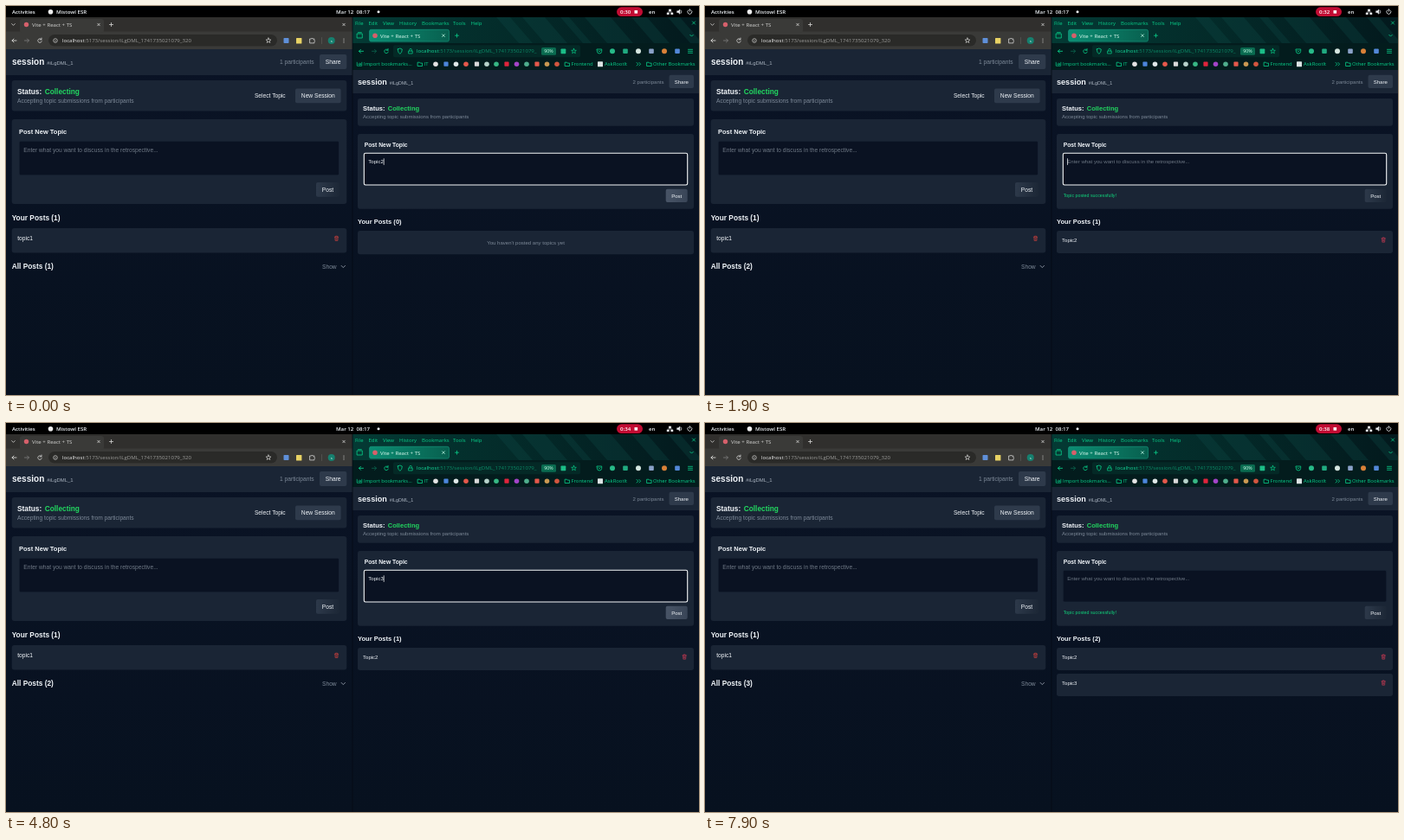
An HTML page for the animation above (8 s loop, 800x450 px).

```html
<!DOCTYPE html>
<html lang="en">
<head>
<meta charset="utf-8">
<title>Session board</title>
<style>
  html, body { margin: 0; width: 100%; height: 100%; overflow: hidden; background: #07101e; }
  svg { display: block; width: 100vw; height: 100vh; }
  text { font-family: "Liberation Sans", Arial, sans-serif; white-space: pre; }
  .ui { font-family: "Open Sans", "Noto Sans", sans-serif; }
  .bold { font-weight: 700; }
  .semi { font-weight: 600; }
</style>
</head>
<body>
<svg id="stage" viewBox="0 0 800 450"></svg>
<script>
const LOOP = 8000;
const WHITE = '#f1f5f9', MUTED = '#7d8998', CARD = '#1a2535', FIELD = '#0a1222',
      EDGE = '#1d2939', BUTTON = '#2e3a4b', GREEN = '#22d760', MINT = '#08d08a', RED = '#c9403f';

const rect = (x, y, w, h, fill, r = 0, more = '') =>
  `<rect x="${x}" y="${y}" width="${w}" height="${h}" rx="${r}" fill="${fill}" ${more}/>`;
const text = (x, y, size, fill, str, cls = '', more = '') =>
  `<text x="${x}" y="${y}" font-size="${size}" fill="${fill}" class="${cls}" ${more}>${str}</text>`;
const mid = (x, y, size, fill, str, cls = '') => text(x, y, size, fill, str, cls, 'text-anchor="middle"');
const dot = (x, y, r, fill) => `<circle cx="${x}" cy="${y}" r="${r}" fill="${fill}"/>`;
const line = (d, color, w = 0.8, fill = 'none') =>
  `<path d="${d}" fill="${fill}" stroke="${color}" stroke-width="${w}" stroke-linecap="round" stroke-linejoin="round"/>`;
const gradient = (id, from, to, dir = 'x2="1" y2="0"') =>
  `<linearGradient id="${id}" x1="0" y1="0" ${dir}><stop stop-color="${from}"/><stop offset="1" stop-color="${to}"/></linearGradient>`;

// Small interface icons, centred on x, y
const cross = (x, y, c, s = 1.6) => line(`M${x - s} ${y - s}l${2 * s} ${2 * s}m0 ${-2 * s}l${-2 * s} ${2 * s}`, c);
const plus = (x, y, c) => line(`M${x - 2} ${y}h4m-2 -2v4`, c);
const arrow = (x, y, c, dir) => line(`M${x - 2.5 * dir} ${y}h${5 * dir}m${-2 * dir} -2l${2 * dir} 2l${-2 * dir} 2`, c, 0.9);
const reload = (x, y, c) => line(`M${x + 2} ${y - 1.2}a2.3 2.3 0 1 0 .3 2m-.3 -3.8v1.9h-1.9`, c);
const chevron = (x, y, c, s = 2) => line(`M${x - s} ${y - s / 2}l${s} ${s}l${s} ${-s}`, c);
const star = (x, y, c) => {
  const points = Array.from({ length: 10 }, (_, i) => {
    const a = i * Math.PI / 5, r = i % 2 ? 1.3 : 3;
    return `${(x + r * Math.sin(a)).toFixed(2)} ${(y - r * Math.cos(a)).toFixed(2)}`;
  });
  return line(`M${points.join('L')}Z`, c, 0.7);
};
const folder = (x, y) => line(`M${x - 2.5} ${y - 2}h2l.8 .9h2.3v3.4h-5.1z`, MINT, 0.8);
const trash = (x, y, c) => line(`M${x - 2.2} ${y - 1.7}h4.4M${x - 1} ${y - 1.8}v-.9h2v.9M${x - 1.7} ${y - 1.6}l.3 4.2h2.8l.3 -4.2M${x - .5} ${y - .3}v1.7M${x + .5} ${y - .3}v1.7`, c, 0.65);
const menuDots = (x, y, c) => [-2, 0, 2].map(d => dot(x, y + d, 0.6, c)).join('');

function topBar() {
  return rect(0, 0, 800, 13, '#000') +
    text(7, 9, 6.1, WHITE, 'Activities', 'ui semi') +
    dot(51.5, 6.7, 2.8, '#eee') + text(58, 9, 6.1, WHITE, 'Mistowl ESR', 'ui semi') +
    text(381, 9, 6.1, WHITE, 'Mar 12  08:17', 'ui semi') + dot(430, 6.7, 1.5, WHITE) +
    rect(705, 1.3, 30, 10.8, '#c20c33', 5.4) +
    text(709, 9, 6.1, '#fff', '', 'ui semi', 'id="timer"') + rect(725.5, 5, 3.6, 3.6, '#fff') +
    text(742, 9, 6.1, WHITE, 'en', 'ui semi') +
    rect(765, 3.7, 3, 2.2, WHITE) + rect(762.8, 7.7, 2.8, 2.2, WHITE) + rect(767.4, 7.7, 2.8, 2.2, WHITE) +
    line('M766.5 6v1M764.2 7.5v-.7h4.6v.7', WHITE, 0.5) +
    line('M774.8 5.8h1.3l1.8 -1.7v5.2l-1.8 -1.7h-1.3z', WHITE, 0.5, WHITE) +
    line('M779.2 5q1.4 1.7 0 3.4', WHITE, 0.7) +
    line('M787.9 4.7a2.5 2.5 0 1 0 2.8 0M789.3 3.6v2.6', WHITE, 0.8);
}

function leftBrowser() {
  const ink = '#d5d5d3';
  return rect(0, 13, 400, 37, '#3a3a38') + rect(0, 13, 400, 16.5, '#302f2d') +
    rect(16, 15, 97, 16, '#3a3a38', 3) +
    chevron(8.5, 21.5, ink, 1.8) + dot(23.5, 21.5, 2.7, '#d5606b') +
    text(30, 24, 6.1, ink, 'Vite + React + TS', 'ui') +
    cross(107, 21.5, ink, 1.3) + plus(121.5, 21.5, ink) + cross(390, 21.5, ink, 1.3) +
    arrow(9.5, 40, ink, -1) + arrow(24, 40, '#777', 1) + reload(39, 40, ink) +
    rect(49, 33, 264, 13.6, '#2a2a28', 6.8) +
    `<circle cx="57" cy="40" r="2.3" fill="none" stroke="${ink}" stroke-width=".7"/>` + line('M57 39.7v1.2', ink, 0.6) +
    text(65, 42.2, 6.1, '#9c9c9a', '<tspan fill="#eee">localhost</tspan>:5173/session/iLgDML_1741735021079_320', 'ui') +
    star(303, 40, ink) + rect(320.5, 37, 6, 6, '#5f8fd8', 0.8) + rect(335, 37, 6.4, 6.4, '#e8d264', 0.5) +
    line('M351 38h1.5q.7 -1.8 1.4 0h2v2q1.6 .7 0 1.4v1.5h-4.9z', ink, 0.8) +
    line('M364.5 36.5v7', '#62625f', 0.6) +
    dot(375.7, 40, 4, '#16806f') + mid(375.7, 41.6, 4.2, '#d8efea', 's') + menuDots(390, 40, ink);
}

function rightBrowser() {
  const bands = [[566, 16], [596, 26], [640, 10], [668, 30], [722, 18], [764, 14]]
    .map(([x, w]) => `<path d="M${x} 13h${w}l26 30h${-w}z" fill="#0f4a45" opacity=".32"/>`).join('');
  const menu = [[403, 'File'], [418.5, 'Edit'], [435, 'View'], [454, 'History'], [480, 'Bookmarks'], [516, 'Tools'], [536.5, 'Help']]
    .map(([x, label]) => text(x, 21.5, 6, MINT, label, 'ui')).join('');
  const marks = [[496, '#e4e4e4'], [508, '#4c86dc'], [519.5, '#dfe9e8'], [531, '#e5584b'], [543.5, '#d9d9d9'], [555, '#b7d3cb'],
    [566, '#37b884'], [578, '#e0243c'], [589.5, '#a344c8'], [601, '#4fae8d'], [613, '#e5584b'], [624.5, '#c99852'], [636, '#d3563f']]
    .map(([x, c], i) => i % 3 == 1 ? rect(x - 2.6, 64.6, 5.2, 5.2, c, 0.8) : dot(x, 67.2, 2.8, c)).join('');
  const tools = [[700, '#27ba88'], [715, '#20aa80'], [730, '#d5e6e0'], [745, '#8aa1c8'], [760, '#d98138'], [775, '#5388d8']]
    .map(([x, c], i) => i % 2 ? rect(x - 2.8, 49.5, 5.6, 5.6, c, 1) : dot(x, 52.3, 3, c)).join('');
  return rect(400, 13, 400, 61, '#031c1d') + rect(400, 13, 400, 30, 'url(#theme)') + bands + menu +
    cross(794, 19.5, MINT, 1.6) +
    line('M405.5 32h5.8v5h-5.8zM406.5 30.7h3.8', MINT, 0.8) +
    rect(419.5, 27.3, 92, 13.8, 'url(#tab)', 2, 'stroke="#16a084" stroke-width=".6"') +
    dot(426, 34.2, 2.8, '#d5606b') + text(432, 36.6, 6.1, '#e2fff4', 'Vite + React + TS', 'ui') +
    cross(505, 34.2, '#b8f0df', 1.4) + plus(520.5, 34.2, MINT) + chevron(791.5, 34.2, MINT, 1.8) +
    rect(447, 45.3, 216, 14, '#042926', 2) +
    arrow(410, 52.3, MINT, -1) + arrow(425, 52.3, '#0a604b', 1) + reload(439, 52.3, MINT) +
    line('M452.3 50l2.5 -1l2.5 1q0 4 -2.5 5.4q-2.5 -1.4 -2.5 -5.4z', MINT) +
    line('M465 52h4.2v3h-4.2zM465.8 52v-1.3a1.3 1.3 0 0 1 2.6 0v1.3', MINT, 0.7) +
    text(474, 54.4, 6.1, '#0c8b68', '<tspan fill="#14dc9b">localhost</tspan>:5173/session/iLgDML_1741735021079_', 'ui') +
    rect(618, 48, 17, 8.8, '#0a6b50', 1.5) + mid(626.5, 54.3, 5.3, '#c8ffe9', '90%', 'ui') +
    rect(640.5, 49.4, 5.8, 5.8, '#1bbd87', 0.8) + star(655.5, 52.3, MINT) +
    line('M682.3 50h5.4v2.3a2.7 2.7 0 0 1 -5.4 0zM683.7 51.6l1.3 1.2l1.3 -1.2', MINT, 0.8) + tools +
    line('M787.5 50.3h5m-5 2h5m-5 2h5', MINT, 0.8) +
    line('M405.2 65.2v4h5.6v-4M406.7 67.2h2.8m-1 -1.2l1 1.2l-1 1.2', MINT, 0.7) +
    text(413, 69.4, 5.9, MINT, 'Import bookmarks...', 'ui') +
    folder(478, 67.2) + text(482.5, 69.4, 5.9, MINT, 'IT', 'ui') + marks +
    folder(648, 67.2) + text(652.5, 69.4, 5.9, MINT, 'Frontend', 'ui') +
    rect(683, 64.3, 6, 6, '#dce4e4', 0.6) + text(691, 69.4, 5.9, MINT, 'AskRootIt', 'ui') +
    line('M728 65.4l1.8 1.8l-1.8 1.8m2.8 -3.6l1.8 1.8l-1.8 1.8', MINT, 0.8) +
    folder(742.5, 67.2) + text(747, 69.4, 5.9, MINT, 'Other Bookmarks', 'ui');
}

function leftPage() {
  return rect(0, 49.5, 400, 400.5, 'url(#page)') + rect(0, 49.5, 400, 30.5, CARD) +
    text(7, 68, 10, WHITE, 'session', 'bold') + text(47.3, 67.8, 5.95, '#aab4c0', '#iLgDML_1') +
    text(316, 67, 6.67, MUTED, '1 participants') +
    rect(362, 56, 31.3, 17, BUTTON, 2) + mid(377.7, 67, 6.67, WHITE, 'Share') +
    rect(6.7, 86, 386.6, 35.4, CARD, 3) +
    text(13, 101.5, 8.33, WHITE, 'Status:', 'bold') + text(44.7, 101.5, 8.33, GREEN, 'Collecting', 'bold') +
    text(13, 112, 6.67, MUTED, 'Accepting topic submissions from participants') +
    mid(304.8, 106.2, 6.67, WHITE, 'Select Topic') +
    rect(334, 95.5, 52.6, 16.7, BUTTON, 2) + mid(360.3, 106.2, 6.67, WHITE, 'New Session') +
    rect(6.7, 131, 386.6, 98, CARD, 3) + text(15, 148, 7.5, WHITE, 'Post New Topic', 'bold') +
    rect(15.2, 156.3, 369.3, 39.5, FIELD, 1.7, `stroke="${EDGE}" stroke-width=".6"`) +
    text(20.3, 169, 6.67, '#6e7885', 'Enter what you want to discuss in the retrospective...') +
    rect(358, 204, 27, 16.7, 'url(#idle)', 2) + mid(371.5, 214.7, 6.67, WHITE, 'Post') +
    text(6.7, 247.6, 8.33, WHITE, 'Your Posts (1)', 'bold') +
    rect(6.7, 257, 386.6, 28.5, CARD, 3) + text(13.2, 271.2, 6.67, WHITE, 'topic1') + trash(381.5, 268.9, RED) +
    text(6.7, 304.4, 8.33, WHITE, '', 'bold', 'id="allPosts"') +
    text(365, 303.6, 6.67, MUTED, 'Show') + chevron(389.3, 301.5, '#a3adb9', 2.2);
}

const post = (id, y, title) => `<g id="${id}">` + rect(406, y, 388, 26, CARD, 2.7) +
  text(412, y + 13, 6.05, WHITE, title) + trash(783.2, y + 10.6, '#c43a52') + '</g>';

function rightPage() {
  return rect(400, 74, 400, 376, 'url(#page)') + rect(400, 73.5, 400, 27.5, CARD) +
    text(406, 91, 9.1, WHITE, 'session', 'bold') + text(442.8, 90.6, 5.4, '#aab4c0', '#iLgDML_1') +
    text(723.5, 89.5, 6.05, MUTED, '2 participants') +
    rect(765.5, 79.7, 28.5, 15.3, BUTTON, 2) + mid(779.7, 89.5, 6.05, WHITE, 'Share') +
    rect(406, 107, 388, 31.7, CARD, 2.7) +
    text(412, 121, 7.55, WHITE, 'Status:', 'bold') + text(440.7, 121, 7.55, GREEN, 'Collecting', 'bold') +
    text(412, 130.3, 6.05, MUTED, 'Accepting topic submissions from participants') +
    rect(406, 148, 388, 86.7, CARD, 2.7) + text(413.7, 163.3, 6.78, WHITE, 'Post New Topic', 'bold') +
    rect(413.3, 170.3, 373.4, 36.7, FIELD, 1.7, 'id="field"') +
    text(418.3, 182.3, 6.05, '#6e7885', 'Enter what you want to discuss in the retrospective...', '', 'id="hint"') +
    text(418.3, 182.3, 6.05, WHITE, '', '', 'id="typed"') + rect(418, 176.3, 0.7, 7.6, '#fff', 0, 'id="caret"') +
    text(413.7, 221.3, 5.3, '#10d47c', 'Topic posted successfully!', '', 'id="notice"') +
    rect(761.7, 211.7, 25, 15.3, '', 2, 'id="post"') + mid(774.2, 221.5, 6.05, WHITE, 'Post') +
    text(406, 251.5, 7.55, WHITE, '', 'bold', 'id="yourPosts"') +
    '<g id="empty">' + rect(406, 260, 388, 27.3, CARD, 2.7) + mid(600, 276, 6.05, MUTED, "You haven't posted any topics yet") + '</g>' +
    post('post2', 260, 'Topic2') + post('post3', 290, 'Topic3');
}

const stage = document.getElementById('stage');
stage.innerHTML = '<defs>' +
  gradient('page', '#0a1325', '#07111f', 'x2="0" y2="1"') + gradient('theme', '#043a34', '#03191d') +
  gradient('tab', '#0c8d73', '#08604f') + gradient('idle', '#2d394a', '#1c2736') +
  gradient('ready', '#485466', '#394557') + gradient('pressed', '#66758a', '#455266') + '</defs>' +
  leftPage() + rightPage() + leftBrowser() + rightBrowser() + rect(399.6, 13, 0.8, 437, '#050b15') + topBar();

const el = Object.fromEntries([...stage.querySelectorAll('[id]')].map(e => [e.id, e]));
const set = (e, attrs) => Object.entries(attrs).forEach(([k, v]) => e.setAttribute(k, v));
const setText = (e, s) => { if (e.textContent !== s) e.textContent = s; };
const show = (e, on) => set(e, { opacity: +on });
const ramp = (t, from, to) => Math.min(1, Math.max(0, (t - from) / (to - from)));
const within = (t, ...spans) => spans.some(([from, to]) => t >= from && t < to);
const latest = (t, steps) => steps.filter(([at]) => t >= at).pop()[1];

const TYPING = [[0, 'Topic2'], [600, ''], [2400, 'T'], [2700, 'To'], [3800, 'Top'], [3900, 'Topi'],
  [4000, 'Topic'], [4800, 'Topic3'], [7100, '']];
const CLOCK = [[0, 30], [900, 31], [1900, 32], [2900, 33], [3900, 34], [5100, 35], [5900, 36], [6900, 37], [7900, 38]];

function enter(card, t, start) {
  const p = ramp(t, start, start + 400);
  set(card, { opacity: p, transform: `translate(0 ${3.75 * (1 - p)})` });
}

function draw(now) {
  const t = now % LOOP;
  const typed = latest(t, TYPING);
  const focused = within(t, [0, 600], [1500, 7100]);
  const pressed = within(t, [450, 600], [6300, 7100]);

  setText(el.timer, `0:${latest(t, CLOCK)}`);
  setText(el.allPosts, `All Posts (${latest(t, [[0, 1], [1000, 2], [7500, 3]])})`);
  setText(el.yourPosts, `Your Posts (${latest(t, [[0, 0], [700, 1], [7200, 2]])})`);

  setText(el.typed, typed);
  show(el.hint, !typed);
  set(el.field, { stroke: focused ? '#f4f6f8' : EDGE, 'stroke-width': focused ? 1.1 : 0.6 });
  set(el.caret, { x: 418.3 + (typed ? el.typed.getComputedTextLength() : 0) });
  show(el.caret, focused && !within(t, [100, 600], [3200, 3700], [5100, 5600]));
  set(el.post, { fill: `url(#${pressed ? 'pressed' : typed ? 'ready' : 'idle'})` });

  show(el.empty, t < 700);
  enter(el.post2, t, 760);
  enter(el.post3, t, 7260);
  set(el.notice, { opacity: ramp(t, 760, 1160) - ramp(t, 3700, 4100) + ramp(t, 7260, 7660) });
  requestAnimationFrame(draw);
}
requestAnimationFrame(draw);
</script>
</body>
</html>
```
